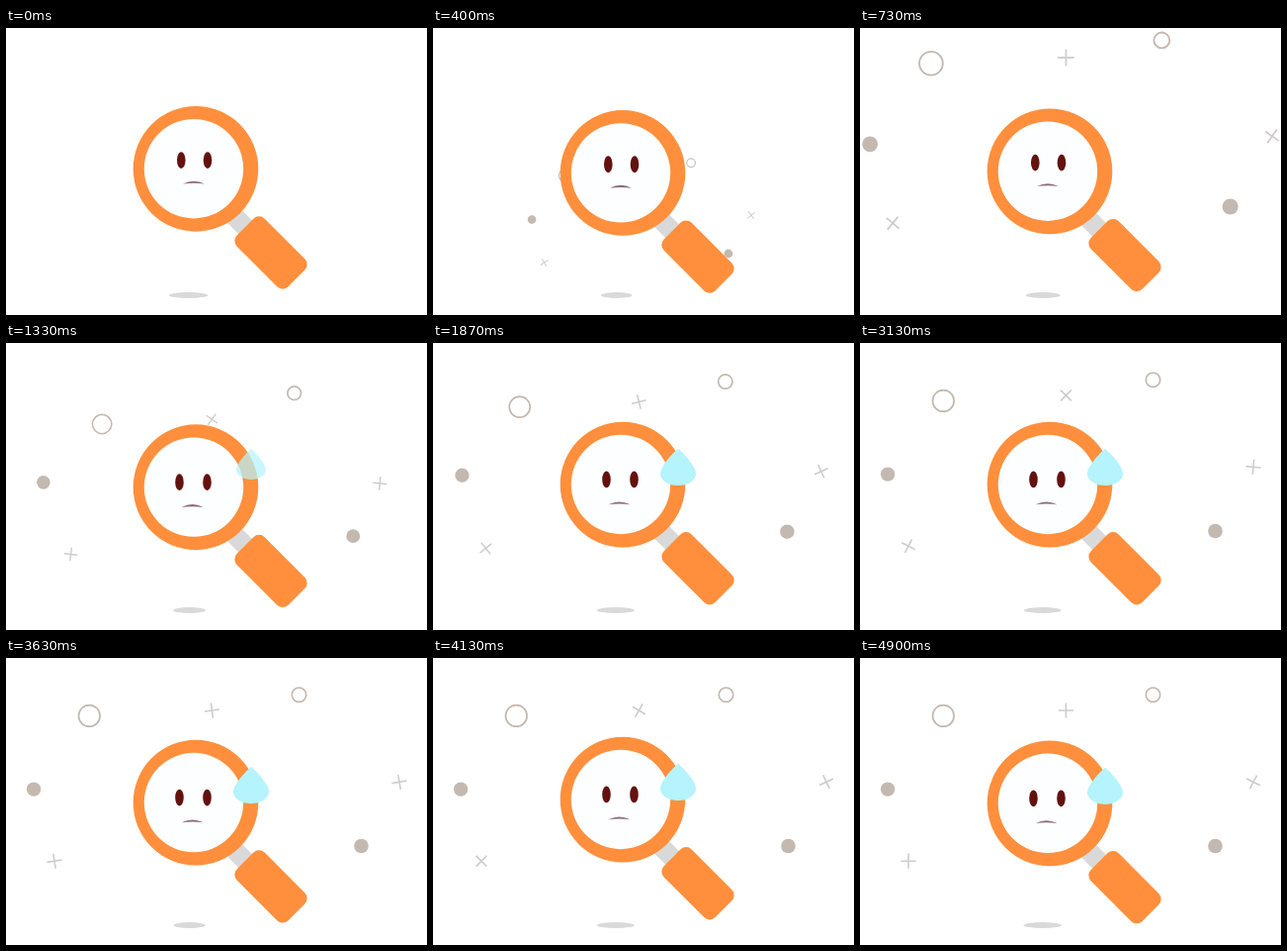
These frames come from a looping animation (426 px wide and 290 px high, 4.93 s). An HTML page with a canvas:

```html
<!DOCTYPE html>
<html>
<head>
<meta charset="utf-8">
<title>Worried magnifier</title>
<style>
html, body { margin: 0; width: 100%; height: 100%; overflow: hidden; background: #fff; }
canvas { display: block; width: 426px; height: 290px; }
</style>
</head>
<body>
<canvas id="stage"></canvas>
<script>
const W = 426, H = 290, LOOP = 4930, STEPS = 148;
const ORANGE = '#ff8f3c', GREY = '#d9d9d9', TAUPE = '#c3b9b1', PLUS = '#d0cbcb';
const canvas = document.getElementById('stage');
const ctx = canvas.getContext('2d');
const dpr = window.devicePixelRatio || 1;
canvas.width = W * dpr;
canvas.height = H * dpr;

const clamp = u => Math.max(0, Math.min(1, u));
const lerp = (a, b, u) => a + (b - a) * u;
const span = (k, a, b) => clamp((k - a) / (b - a));
const smooth = u => (1 - Math.cos(Math.PI * u)) / 2;
const easeOut = (u, p) => 1 - Math.pow(1 - u, p);
const wave = k => (1 - Math.cos(2 * Math.PI * k / 30)) / 2;

function ellipse(x, y, rx, ry, color) {
  ctx.beginPath();
  ctx.ellipse(x, y, rx, ry, 0, 0, 2 * Math.PI);
  ctx.fillStyle = color;
  ctx.fill();
}

function placed(x, y, draw) {
  ctx.save();
  ctx.translate(x, y);
  draw();
  ctx.restore();
}

// Piecewise linear value through [step, value] pairs
function along(keys, k) {
  if (k <= keys[0][0]) return keys[0][1];
  for (let i = 1; i < keys.length; i++) {
    const [a, va] = keys[i - 1], [b, vb] = keys[i];
    if (k <= b) return lerp(va, vb, (k - a) / (b - a));
  }
  return keys[keys.length - 1][1];
}

// Burst outward, swing back, settle
function burst(k, low, end, pIn, pOut) {
  if (k < 22) return 1.1 * k / 22;
  if (k < low) return lerp(1.1, 0.896, easeOut(span(k, 22, low), pIn));
  return lerp(0.896, 1, easeOut(span(k, low, end), pOut));
}

const ORIGIN = [208, 285];
const rings = [[84.3, 58.4, 10.8, true], [296.5, 37.2, 7.2, false]];
const dots = [[28.1, 132.6, 7.2], [359.5, 190, 7.3]];
const pluses = [
  [208.4, 53, [[0, -40], [22, 0], [40, 35], [73, 120], [94, 135], [124, 210], [144, 270]]],
  [398, 125.3, [[0, 70], [22, 35], [40, 5], [73, -55], [94, -85], [124, -115], [148, -154]]],
  [49, 205.2, [[0, 80], [22, 40], [40, 7], [73, -87], [94, -153], [124, -225], [144, -270]]]
];

function particles(k) {
  const light = burst(k, 32, 73, 1.5, 3);
  const heavy = burst(k, 40, 73, 2, 2);
  const scaled = (s, draw) => placed(...ORIGIN, () => {
    ctx.scale(s, s);
    ctx.translate(-ORIGIN[0], -ORIGIN[1]);
    draw();
  });
  const ring = ([x, y, r]) => {
    ctx.beginPath();
    ctx.arc(x, y, r, 0, 2 * Math.PI);
    ctx.strokeStyle = TAUPE;
    ctx.lineWidth = 1.7;
    ctx.stroke();
  };
  const plus = ([x, y, turn]) => placed(x, y, () => {
    ctx.rotate(along(turn, k) * Math.PI / 180);
    ctx.beginPath();
    ctx.moveTo(-7.6, 0);
    ctx.lineTo(7.6, 0);
    ctx.moveTo(0, -7.6);
    ctx.lineTo(0, 7.6);
    ctx.strokeStyle = PLUS;
    ctx.lineWidth = 1.6;
    ctx.stroke();
  });
  ctx.globalAlpha = span(k, 3, 11);
  if (ctx.globalAlpha > 0) {
    scaled(light, () => {
      dots.forEach(([x, y, r]) => ellipse(x, y, r, r, TAUPE));
      rings.filter(r => !r[3]).forEach(ring);
    });
    scaled(heavy, () => {
      rings.filter(r => r[3]).forEach(ring);
      pluses.forEach(plus);
    });
  }
  ctx.globalAlpha = 1;
}

function shadow(k) {
  const u = wave(k);
  ellipse(lerp(184.6, 185.8, u), 270, lerp(19.7, 15.4, u), 3, GREY);
}

function handle() {
  placed(268, 227, () => {
    ctx.rotate(Math.PI / 4);
    ctx.fillStyle = GREY;
    ctx.fillRect(-66, -9.7, 36, 19.4);
    ctx.fillStyle = ORANGE;
    ctx.beginPath();
    ctx.roundRect(-36.7, -19.8, 73.4, 39.6, 8);
    ctx.fill();
  });
}

function face(k) {
  const u = smooth(span(k, 26, 38));
  const eyeY = lerp(133.6, 137.2, u);
  ellipse(lerp(177.3, 175.5, u), eyeY, 4.3, 8.4, '#64120f');
  ellipse(lerp(204, 203.5, u), eyeY, 4.3, 8.4, '#64120f');
  placed(lerp(190, 188.6, u), lerp(157.2, 162.2, u), () => {
    ctx.beginPath();
    ctx.moveTo(-11, 0.3);
    ctx.quadraticCurveTo(0, -5.4, 11, 0.3);
    ctx.quadraticCurveTo(0, -1.2, -11, 0.3);
    ctx.fillStyle = '#8c6b78';
    ctx.fill();
  });
}

function drop(k) {
  const u = span(k, 31, 43.5);
  if (!u) return;
  placed(248, 124.7 - 20 * (1 - u), () => {
    const s = lerp(0.4, 1, u);
    ctx.scale(s, s);
    ctx.globalAlpha = u;
    ctx.beginPath();
    ctx.moveTo(0, -18.6);
    ctx.bezierCurveTo(5, -14.5, 18, -1, 18, 7);
    ctx.bezierCurveTo(18, 13, 10, 18.6, 0, 18.6);
    ctx.bezierCurveTo(-10, 18.6, -18, 13, -18, 7);
    ctx.bezierCurveTo(-18, -1, -5, -14.5, 0, -18.6);
    ctx.fillStyle = '#b5f3fd';
    ctx.fill();
  });
}

function draw(k) {
  ctx.setTransform(dpr, 0, 0, dpr, 0, 0);
  ctx.fillStyle = '#fff';
  ctx.fillRect(0, 0, W, H);
  shadow(k);
  particles(k);
  // The bobbing rests at its lowest point near the end of the loop
  placed(0, 4.6 * wave(Math.min(k, 135)), () => {
    handle();
    ellipse(192, 142.3, 63.3, 63.4, ORANGE);
    ellipse(190, 142.2, 50.2, 50.2, '#fcfeff');
    face(k);
    drop(k);
  });
}

const start = performance.now();
function tick() {
  const t = (performance.now() - start) % LOOP;
  draw(Math.min(STEPS - 1, Math.floor(t * STEPS / LOOP + 0.15)));
  requestAnimationFrame(tick);
}
tick();
</script>
</body>
</html>
```
